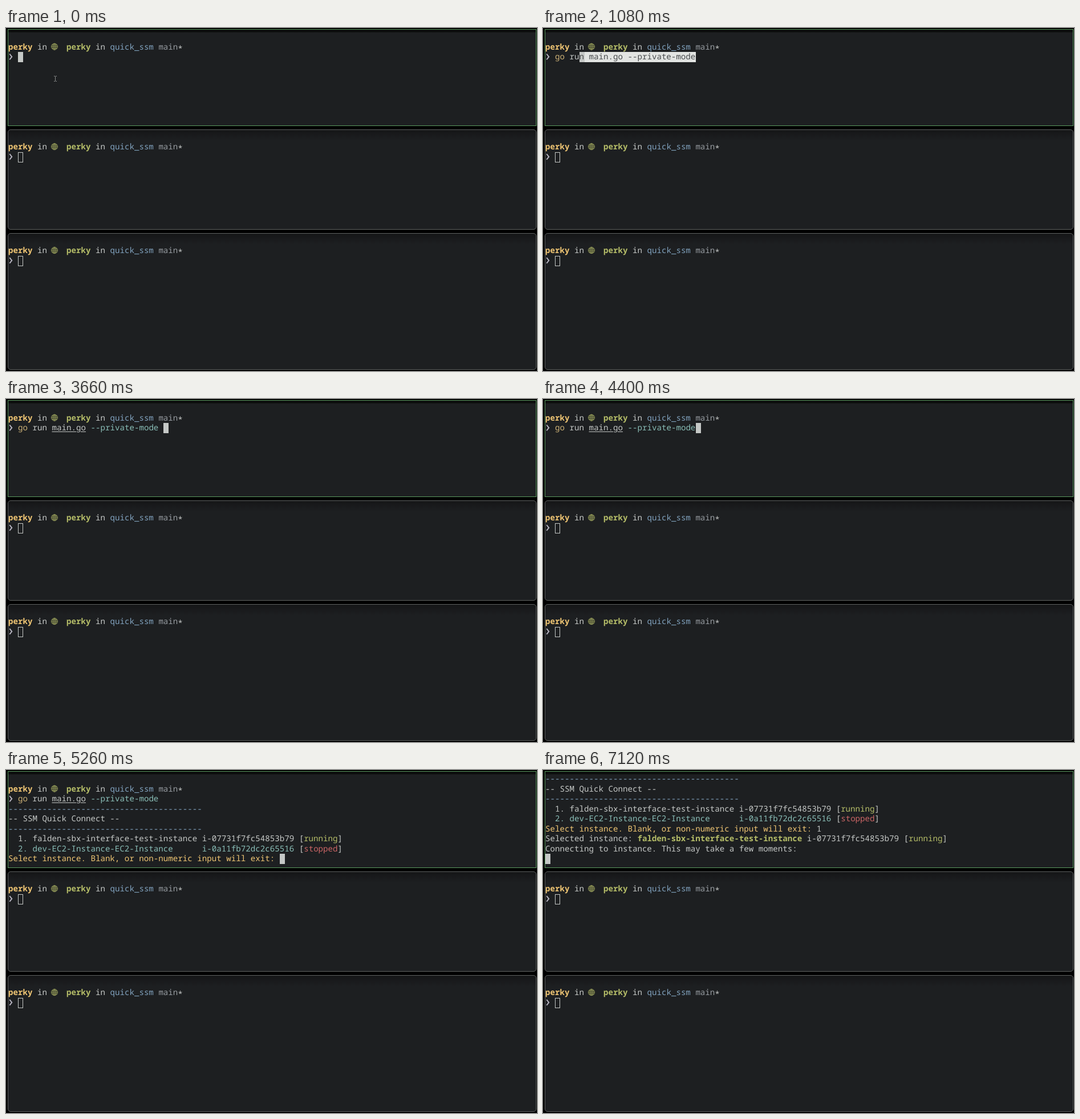
These frames come from a looping animation (931x602 px, 8000 ms). An HTML page:

```html
<!DOCTYPE html>
<html lang="en">
<head>
<meta charset="utf-8">
<title>Terminal session</title>
<style>
html, body { margin: 0; width: 100%; height: 100%; overflow: hidden; background: #000; }
#stage { position: relative; width: 931px; height: 602px; overflow: hidden; }
.pane, pre, .cell, svg { position: absolute; box-sizing: border-box; }
.pane {
  left: 3px; width: 927px; border: 1px solid #5f6261; border-radius: 5px;
  background: linear-gradient(#151617, #1d1f21 18px);
}
.pane.active { border-color: #5b9a60; border-radius: 0; background: linear-gradient(#0b0c0c 4px, #1d1f21 5px); }
pre {
  left: 4px; margin: 0; color: #c5c8c6; white-space: pre;
  font: 14.1667px/17.5px "Noto Sans Mono", "DejaVu Sans Mono", monospace;
  text-rendering: geometricPrecision; font-variant-ligatures: none;
}
.cell { height: 18px; width: 9px; background: #c5c8c6; }
.hollow { background: none; border: 1px solid #c5c8c6; }
#hint { background: #e2e4e2; }
u { text-underline-offset: 2px; text-decoration-thickness: 1px; }
.y { color: #f0c674 } .g { color: #b5bd68 } .b { color: #81a2be } .c { color: #8abeb7 }
.r { color: #cc6666 } .m { color: #969ba0 } .k { color: #cdb277 } .d { color: #484b4d }
.low { position: relative; top: 3px }
svg { left: 0; top: 0; fill: none; }
</style>
</head>
<body>
<div id="stage">
  <div class="pane active" style="top:2px;height:170px"></div>
  <div class="pane" style="top:178px;height:176px"></div>
  <div class="pane" style="top:360px;height:240px"></div>
  <div class="cell" id="hint"></div>
  <div class="cell" id="cursor"></div>
  <div class="cell hollow" style="left:21px;top:217.5px"></div>
  <div class="cell hollow" style="left:21px;top:399.5px"></div>
  <pre id="main" style="top:7px"></pre>
  <pre class="idle" style="top:182.5px"></pre>
  <pre class="idle" style="top:364.5px"></pre>
  <svg width="931" height="602">
    <defs>
      <g id="icons">
        <g stroke="#a3aa60" stroke-width=".9">
          <circle cx="85" cy="25.7" r="5.5"/>
          <ellipse cx="85" cy="25.7" rx="2.7" ry="5.5"/>
          <path d="M85 20.2v11M79.5 25.7h11M80.4 22.9h9.2M80.4 28.5h9.2"/>
        </g>
        <path d="M6.3 38.5 10.2 43.5 6.3 48.5" stroke="#b8b5c2" stroke-width="2"/>
      </g>
    </defs>
    <use href="#icons" y="7" id="topIcons"/>
    <use href="#icons" y="182.5"/>
    <use href="#icons" y="364.5"/>
    <path id="mouse" stroke="#8d8f8e" d="M84 84.5h2M87 84.5h2M86.5 85v8M84 93.5h2M87 93.5h2"/>
  </svg>
</div>
<script>
const LOOP = 8000, CELL = 8.5, ROW = 17.5, LEFT = 4, TOP = 7;
const command = "go run main.go --private-mode";
const $ = id => document.getElementById(id);
const tint = (cls, text) => `<span class="${cls}">${text}</span>`;
const bold = (cls, text) => `<b class="${cls}">${text}</b>`;

const prompt = ["", bold("y", "perky") + " in    " + bold("g", "perky") +
  " in " + tint("b", "quick_ssm") + " " + tint("m", "main") + tint("low", "*")];
const rule = tint("b", "-".repeat(40));
const banner = [rule, "-- SSM Quick Connect --", rule];
const host = "falden-sbx-interface-test-instance";
const hostInfo = `i-07731f7fc54853b79 [${tint("g", "running")}]`;
const list = [
  `  1. ${host} ${hostInfo}`,
  tint("c", "  2. dev-EC2-Instance-EC2-Instance      i-0a11fb72dc2c65516") + ` [${tint("r", "stopped")}]`
];
const question = tint("y", "Select instance. Blank, or non-numeric input will exit: ");
const fullCommand = "  " + tint("k", "go") + " run <u>main.go</u> " + tint("c", "--private-mode");

function typing(count) {
  const typed = command.slice(0, count);
  const line = "  " + tint("k", typed.slice(0, 2)) + typed.slice(2) + tint("d", command.slice(count));
  return { lines: [...prompt, line], row: 2, col: 2 + count, hint: true };
}
const entered = (row, col, ...output) => ({ lines: [...prompt, fullCommand, ...output], row, col });

// Each state holds from its start time until the next one.
const states = [
  [0, { lines: prompt, row: 2, col: 2 }],
  [680, typing(1)],
  [740, typing(2)],
  [940, typing(3)],
  [1010, typing(4)],
  [1080, typing(5)],
  [2070, entered(2, 31)],
  [3660, entered(2, 32)],
  [3740, entered(2, 33)],
  [4400, entered(2, 31)],
  [4540, entered(3, 0)],
  [4860, entered(6, 0, ...banner)],
  [5260, entered(8, 56, ...banner, ...list, question)],
  [6670, entered(8, 57, ...banner, ...list, question + "1")],
  [7120, {
    lines: [...banner, ...list, question + "1",
      "Selected instance: " + bold("g", host) + " " + hostInfo,
      "Connecting to instance. This may take a few moments:"],
    row: 8, col: 0, scrolled: true
  }]
];

function place(el, row, col) {
  el.style.left = LEFT + col * CELL + "px";
  el.style.top = TOP + row * ROW + "px";
}

let shown;
function show(index) {
  if (index === shown) return;
  shown = index;
  const { lines, row, col, hint, scrolled } = states[index][1];
  $("main").innerHTML = lines.join("\n");
  place($("cursor"), row, col);
  place($("hint"), row, col);
  $("hint").style.width = (hint ? command.length + 2 - col : 0) * CELL + "px";
  $("topIcons").style.display = scrolled ? "none" : "";
  $("mouse").style.display = index ? "none" : "";
}

document.querySelectorAll(".idle").forEach(el => el.innerHTML = prompt.join("\n"));

const start = performance.now();
function tick(now) {
  const time = Math.max(0, now - start) % LOOP;
  show(states.findLastIndex(([from]) => from <= time));
  requestAnimationFrame(tick);
}
show(0);
requestAnimationFrame(tick);
</script>
</body>
</html>
```
